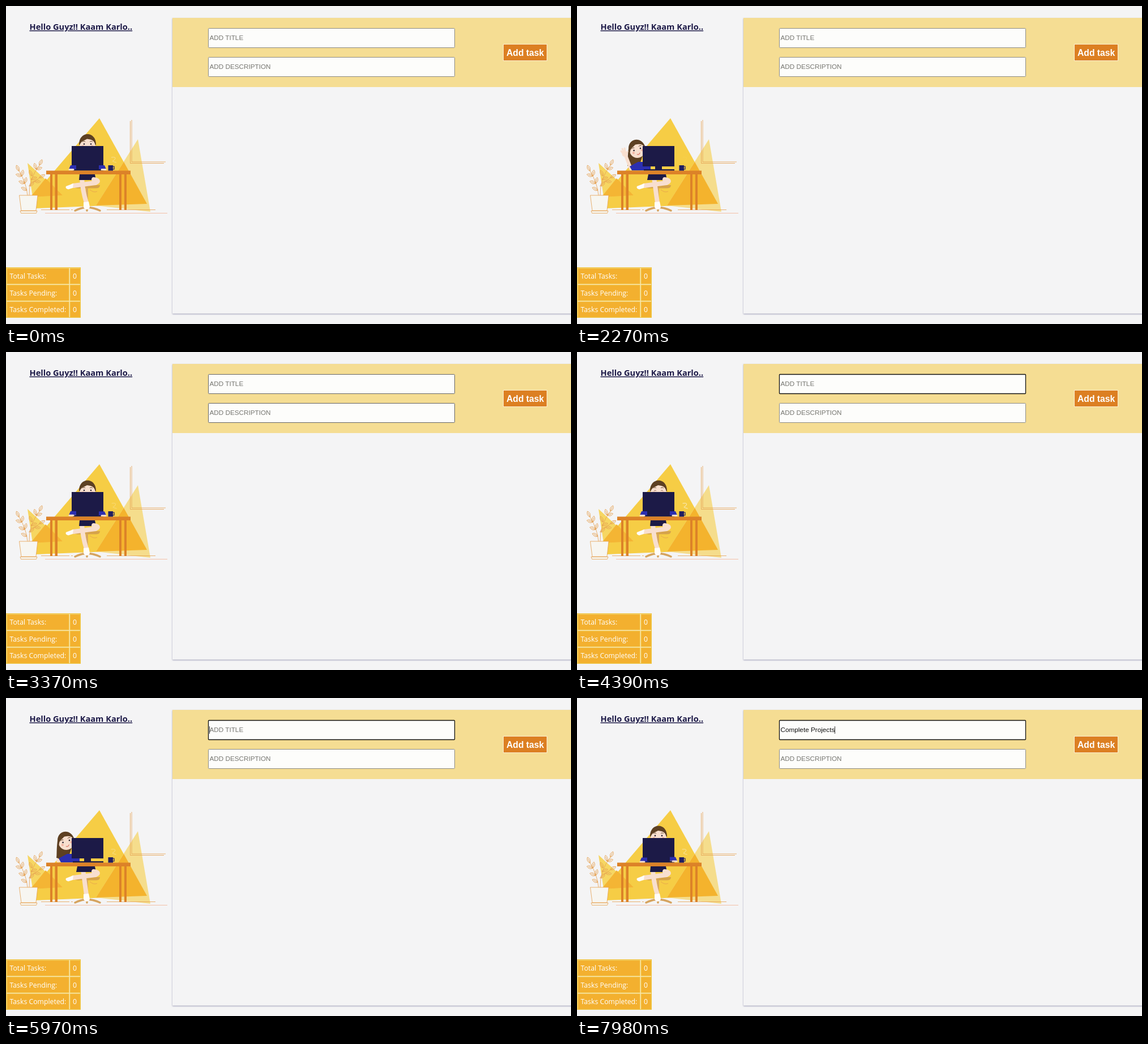
These frames come from a looping animation (998 px wide and 561 px high, 8 s). An HTML page:

```html
<!DOCTYPE html>
<html lang="en">
<head>
<meta charset="utf-8">
<title>Task list</title>
<style>
  html, body { margin: 0; width: 100%; height: 100%; overflow: hidden; background: #f4f4f5; }
  svg { display: block; width: 998px; height: 561px; }
  .ui { font: 12.25px "Open Sans", "Noto Sans", sans-serif; fill: #fff; }
  .head { font: 700 14.6px "Open Sans", "Noto Sans", sans-serif; fill: #1d1a48; text-decoration: underline; }
  .field { font: 11.72px "Liberation Sans", Arial, sans-serif; fill: #757570; }
  .button { font: 700 15.7px "Liberation Sans", Arial, sans-serif; fill: #fff; }
  .line { fill: none; stroke: #e5a050; stroke-width: .8; }
  .skin { fill: #f8dfcf; }
  .limb { fill: none; stroke: #f8dfcf; stroke-linecap: round; stroke-linejoin: round; }
  .white { fill: #fffdf9; }
  .navy { fill: #1c1a47; }
  .blue { fill: #2c2fb0; }
  .hair { fill: #5d4023; }
  .wood { fill: #dc8228; }
</style>
</head>
<body>
<svg viewBox="0 0 998 561">
  <defs>
    <filter id="shadow" x="-5%" y="-5%" width="110%" height="110%">
      <feDropShadow dx="0" dy="1" stdDeviation="1.1" flood-color="#504f80" flood-opacity=".6"/>
    </filter>
  </defs>

  <text class="head" x="41.5" y="42">Hello Guyz!! Kaam Karlo..</text>

  <!-- form panel -->
  <rect x="294" y="21" width="720" height="521.5" fill="#f4f4f5" filter="url(#shadow)"/>
  <rect x="294" y="21" width="704" height="122" fill="#f5dd93"/>
  <rect id="titleBox" x="357.5" y="39.5" width="435" height="34" rx="1" fill="#fdfdfb"/>
  <rect id="descBox" x="357.5" y="90.5" width="435" height="34" rx="1" fill="#fdfdfb"/>
  <text id="title" class="field" x="359.5" y="60">ADD TITLE</text>
  <text class="field" x="359.5" y="111">ADD DESCRIPTION</text>
  <rect id="caret" y="50" width="1" height="13" fill="#333"/>
  <rect x="878.5" y="67.5" width="77" height="29" fill="#dc7f22" stroke="#fbeed2"/>
  <text class="button" x="884" y="87.5">Add task</text>

  <g id="table"></g>

  <!-- backdrop -->
  <path d="M165 198L249 349 28 358Z" fill="#f6cd45"/>
  <path d="M38 277L100 334 47 337Z" fill="#f6d662"/>
  <path d="M70 304L100 334 47 337 44 336Z" fill="#f4b534"/>
  <path d="M233 235L255 363 159 352Z" fill="#f5dd8c"/>
  <path d="M208 275L249 349 159 352Z" fill="#f4b32d"/>
  <path class="line" d="M219.5 203V277.5H279M222 201V275H282"/>
  <path class="line" d="M62 359.5H112M115 359.5H118M178 359.5H264"/>
  <path d="M69 365.5H285" stroke="#f2c0a8" fill="none"/>
  <g id="plant" class="line">
    <path d="M38 334Q36 312 23 291M41 334Q40 305 59 281M40 318Q48 310 59 303"/>
  </g>
  <path class="line" style="fill:#f7f6f1" d="M23.5 334H56L53 361H27ZM25 361.5H55L53.5 365.500H26.500Z"/>

  <!-- chair and legs -->
  <path d="M119 316H166Q166 321.500 159 321.500H126Q119 321 119 316Z" fill="#d6a34a"/>
  <path d="M143 321V353M122 361Q132 356 143 355 156 356 166 361M143 354V361" fill="none" stroke="#d6a460" stroke-width="3.500" stroke-linecap="round"/>
  <path class="line" d="M148 324Q155 330 161 327"/>
  <path id="leg" class="limb" stroke-width="8"/>
  <path class="white" d="M137 346L146 345 148 354Q148 358 143 359 139 359 137 355Z"/>
  <path id="skirt" class="navy"/>
  <path class="limb" stroke-width="8" d="M155 306Q167 308 158 312L119 317"/>
  <path class="white" d="M119 313L118 321 110 323.500Q104 322 106 318Z"/>

  <!-- upper body -->
  <g id="head">
    <path id="longHair" class="hair" d="M-15 0C-17 14-16 25-17 30Q-6 34 4 30L14 0Z"/>
    <g id="face">
      <ellipse class="skin" cy="2" rx="14" ry="14"/>
      <path class="hair" d="M-15 3C-16-23 16-23 15 3L13.5 2C12-5 8-7-1-8-5-5-11-5-13.500 2Z"/>
      <path d="M-9-3Q-6-5-4-3M4-3Q6-5 9-3" fill="none" stroke="#5d4023" stroke-width=".9"/>
      <g id="eyes" fill="#2a2030"><circle cx="-6" cy="1" r="1.300"/><circle cx="6" cy="1" r="1.300"/></g>
      <path id="lids" d="M-8 2Q-6 0-4 2M4 2Q6 0 8 2" fill="none" stroke="#8a5a45" stroke-width=".8"/>
      <circle cx="-8" cy="5" r="2" fill="#f3b4a2"/><circle cx="8" cy="5" r="2" fill="#f3b4a2"/>
      <path d="M-3 9Q0 12 3 8" fill="none" stroke="#d8604e"/>
    </g>
  </g>
  <g id="lean">
    <path id="restArm" class="limb" stroke-width="6" d="M92 287L106 285"/>
    <g id="waveArm">
      <path class="limb" stroke-width="6" d="M95 287L86 264"/>
      <path class="limb" stroke-width="3" d="M85 265L78 256M85 263L80 252M86 263L84 251M86 265L89 257"/>
      <ellipse class="skin" cx="84" cy="261" rx="4.500" ry="5"/>
    </g>
    <path class="blue" d="M93 283L108 275H130V290H97Z"/>
  </g>

  <!-- desk -->
  <path class="navy" d="M116 247H172V283H150V288H172V290.500H118V288H138V283H116Z"/>
  <g id="arms">
    <g><path class="blue" d="M114 281H124L127 288H111Z"/><path class="limb" stroke-width="3" d="M112 288.500H119"/></g>
    <g><path class="blue" d="M164 281H174L177 288H161Z"/><path class="limb" stroke-width="3" d="M169 288.500H176"/></g>
    <path class="navy" d="M124 281H164V288H124Z"/>
  </g>
  <path class="wood" d="M71 290.500H220V297H71ZM78 297H82V360H78ZM86.500 297H91V360H86.500ZM200 297H204V360H200ZM209 297H213V360H209Z"/>
  <path d="M180.500 281H189V290.500H180.500Z" fill="#211f62"/>
  <path d="M189 283H191V288H189" fill="none" stroke="#211f62" stroke-width="1.200"/>
  <path id="steam" fill="none" stroke="#fbf1d5" d="M186 267Q194 266 193 269T189 273 195 276"/>
</svg>
<script>
const $ = id => document.getElementById(id);
const set = (id, attrs) => { for (const k in attrs) $(id).setAttribute(k, attrs[k]); };
const show = (id, on) => set(id, { visibility: on ? 'visible' : 'hidden' });
const ramp = (t, a, b) => {
  const x = Math.max(0, Math.min(1, (t - a) / (b - a)));
  return x * x * (3 - 2 * x);
};
const pulse = (t, a, b, c, d) => ramp(t, a, b) - ramp(t, c, d);

// summary table
const cell = (x, y, w, text) =>
  `<rect x="${x}" y="${y}" width="${w}" height="27" fill="#f3b02f" stroke="#efbe38"/>
   <text class="ui" x="${x + 4.5}" y="${y + 18}">${text}</text>`;
$('table').innerHTML =
  '<rect x=".5" y="461.5" width="131" height="88" fill="#f9e6b0" stroke="#f0c33c"/>' +
  ['Total Tasks:', 'Tasks Pending:', 'Tasks Completed:'].map((label, i) =>
    cell(2, 463 + i * 29.5, 109, label) + cell(113.5, 463 + i * 29.5, 17, '0')).join('');

// leaves: x, y, angle
const leaves = [[23, 291, -115], [28, 300, -165], [28, 300, -80], [33, 313, -160], [33, 313, -75],
  [37, 325, -155], [59, 281, -65], [53, 288, -105], [53, 288, -15], [46, 300, -115], [44, 306, -20],
  [50, 309, 5], [59, 303, -30], [42, 318, -50]];
$('plant').insertAdjacentHTML('beforeend', leaves.map(([x, y, a]) =>
  `<path transform="translate(${x} ${y}) rotate(${a})" d="M0 0Q5-5 11 0 6 5 0 0H8"/>`).join(''));

// screen activity comes in bursts; the scene rests between them
const bursts = [[0, 340], [610, 870], [1670, 1670], [2120, 5970], [6160, 6650], [7670, 7980]];
const sceneTime = t => {
  const [, end] = bursts.filter(b => b[0] <= t).pop();
  return Math.min(t, end);
};

const entry = 'Complete\u00a0Projects';
const focusAt = 3780;
const typed = (t, start, step, count) =>
  t < start ? 0 : Math.min(count, 1 + Math.floor((t - start) / step));

function drawForm(t) {
  const focused = t >= focusAt;
  const count = typed(t, 6160, 58, 9) + typed(t, 7670, 40, 8);
  const border = t > 3100 && !focused ? '#666' : '#8c8c86';
  set('titleBox', { stroke: focused ? '#111' : border, 'stroke-width': focused ? 1.3 : 1 });
  set('descBox', { stroke: border });
  $('title').textContent = count ? entry.slice(0, count) : 'ADD TITLE';
  $('title').style.fill = count ? '#111' : '';
  show('caret', focused && (count || (t - focusAt) % 1060 < 530));
  set('caret', { x: 359 + (count ? Math.round($('title').getComputedTextLength()) : 0) });
}

function drawScene(t) {
  const lean = pulse(t, 1600, 1670, 2650, 2890) + pulse(t, 4800, 5120, 6180, 6420);
  const wave = pulse(t, 2000, 2120, 2500, 2650) + pulse(t, 5300, 5450, 5850, 5970);
  const blink = [480, 1670, 3050, 4390, 6500].some(b => Math.abs(t - b) < 60);
  const bob = Math.sin(t / 130) * .6 * (1 - lean);
  set('head', { transform: `translate(${144 - 38 * lean} ${242.5 + 9.5 * lean + bob})` });
  set('face', { transform: `rotate(${-18 * lean})` });
  show('longHair', lean > .05);
  show('eyes', !blink);
  show('lids', blink);

  show('lean', lean > .05);
  set('lean', { transform: `translate(${38 * (1 - lean)} 0)` });
  set('restArm', { opacity: wave > .1 ? 0 : 1 });
  set('waveArm', {
    opacity: wave > .1 ? 1 : 0,
    transform: `rotate(${-50 * (1 - wave) + 7 * Math.sin((t - 2270) / 55) * wave} 95 288)`
  });

  show('arms', lean < .3);
  [...$('arms').children].slice(0, 2).forEach((arm, i) =>
    arm.setAttribute('transform', `translate(0 ${Math.sin(t / 45 + i * Math.PI) * .6})`));
  set('leg', { d: `M${134 + 2 * lean} 303Q${135 + 4 * lean} 325 142 347` });
  set('skirt', { d: `M${130 - 4 * lean} 297H157L159 307H${129 - 5 * lean}Z` });
  set('steam', {
    opacity: .5 + .45 * Math.sin(t / 210),
    transform: `translate(${Math.sin(t / 160) * .8} 0)`
  });
}

function frame(now) {
  const t = now % 8000;
  drawForm(t);
  drawScene(sceneTime(t));
  requestAnimationFrame(frame);
}
requestAnimationFrame(frame);
</script>
</body>
</html>
```
